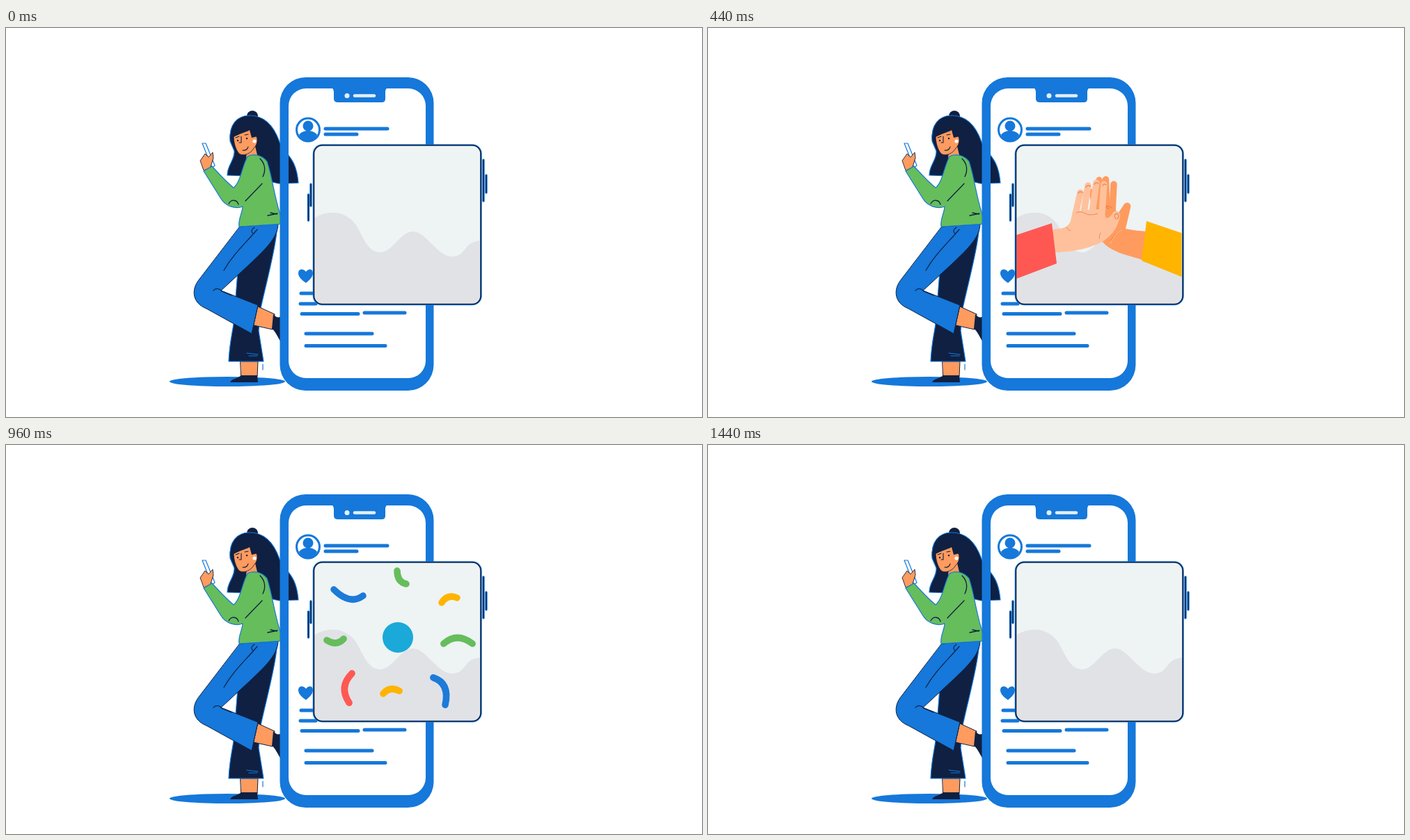
These frames come from a looping animation (1000 by 560 pixels, 1680 ms). An HTML page with a canvas:

```html
<!DOCTYPE html>
<html lang="en">
<head>
<meta charset="utf-8">
<title>High five</title>
<style>
html, body { margin: 0; width: 100%; height: 100%; overflow: hidden; background: #fff; }
canvas { display: block; width: 100%; height: 100%; }
</style>
</head>
<body>
<canvas id="stage" width="1000" height="560"></canvas>
<script>
const ctx = document.getElementById('stage').getContext('2d');
const LOOP = 1680, STEP = 40;
const BLUE = '#1578da', NAVY = '#0f2042', GREEN = '#66bd5c', SKIN = '#ff9b5e',
      PALE = '#ffc19c', RED = '#ff5853', YELLOW = '#ffb400';

const clamp = v => Math.max(0, Math.min(1, v));
const progress = (t, start, length) => clamp((t - start) / length);
const backOut = u => 1 + 2.7 * (u - 1) ** 3 + 1.7 * (u - 1) ** 2;

function fill(d, color, edge, width = 1.2) {
  ctx.fillStyle = color;
  ctx.fill(new Path2D(d));
  if (edge) stroke(d, edge, width);
}

function stroke(d, color, width) {
  ctx.strokeStyle = color;
  ctx.lineWidth = width;
  ctx.stroke(new Path2D(d));
}

function dot(x, y, r, color, ry = r) {
  ctx.fillStyle = color;
  ctx.beginPath();
  ctx.ellipse(x, y, r, ry, 0, 0, 7);
  ctx.fill();
}

function drawWoman() {
  dot(318, 509, 83, BLUE, 7);

  // hair
  dot(354, 127, 8, NAVY);
  fill('M322 163C320 139 332 126 350 126C373 126 386 144 393 164C401 183 417 185 420 223L392 224L345 213L318 212C318 197 329 190 328 177Z',
    NAVY, BLUE);

  // legs
  fill('M337 480H362L361 502H338Z', SKIN, NAVY, 1);
  fill('M338 500H361L362 510H322C325 504 333 505 338 500Z', NAVY);
  fill('M389 292C387 320 373 370 365 408L363 436L370 480H320C321 455 325 440 327 426L333 350Z', NAVY, BLUE);
  stroke('M346 468L362 470M349 472L361 472M369 484V492', BLUE, 1.2);
  fill('M362 401L386 412L383 434L356 428Z', SKIN, NAVY, 1);
  fill('M384 412C390 419 393 416 399 414L397 455C392 449 388 437 382 433Z', NAVY);
  fill('M336 286L391 282C391 302 370 321 350 340L309 378L362 399L353 440L288 404C268 396 266 378 276 364Z', BLUE, NAVY, 1);
  stroke('M361 290C344 310 326 326 313 349M298 378C302 373 308 376 310 379L324 385M357 287C352 290 352 294 355 296', NAVY, 1.2);

  // face
  fill('M346 176L345 188L361 183L358 170Z', SKIN);
  fill('M327 154C327 166 330 175 335 181C341 185 352 181 356 173C362 168 363 156 357 154L351 143Z', SKIN, NAVY, 0.8);
  fill('M322 160C325 141 338 135 352 137L361 156L353 158L350 147C343 151 334 152 322 160Z', NAVY);
  stroke('M338 156L338 165L335 165M340 176Q346 177 348 171M330 158L335 156M343 154L348 153', NAVY, 1.1);
  dot(333, 162, 1.2, NAVY);
  dot(346, 159, 1.2, NAVY);
  dot(357, 163, 2.6, '#fff');

  // hand with phone
  fill('M282 166L287 166L300 198L296 201Z', '#fff', BLUE, 1.2);
  fill('M284 205L279 191L286 181L291 186L297 179L298 187L294 200Z', SKIN, NAVY, 0.9);

  // sweater
  fill('M347 185C355 180 368 183 375 192C382 212 386 245 394 268L397 282L335 286C333 276 340 265 340 257C330 261 316 257 309 246L284 206L296 199C306 210 317 222 327 230C337 222 339 200 347 185Z',
    GREEN, BLUE, 1.2);
  stroke('M365 188C373 196 373 206 369 214M368 224L344 249M320 253C324 246 332 247 334 254M376 270L390 267M380 266L389 268', NAVY, 1.3);
}

function drawPhone() {
  ctx.fillStyle = BLUE;
  ctx.beginPath();
  ctx.roundRect(393.5, 71, 221, 451, 37);
  ctx.roundRect(406, 87, 197, 417, 25);
  ctx.fill('evenodd');
  fill('M466 85H550C546 87 545 89 545 93V102Q545 107 540 107H477Q471 107 471 102V93C471 89 470 87 466 85Z', BLUE);
  dot(490, 97.5, 3.5, '#e5effa');
  stroke('M501 97.5H529', '#e5effa', 4.5);

  // profile picture
  dot(434, 146.5, 18, BLUE);
  dot(434, 146.5, 15, '#fff');
  dot(434, 141, 7.5, BLUE);
  fill('M421 154C424 149 430 148 434 148S444 149 447 154C444 160 439 162 434 162S424 160 421 154Z', BLUE);

  stroke('M459 145H548M459 153H504M424 382H445M423 397H445M425 411.5H506M515 410H573M431 440H526M431 457.5H545', BLUE, 5);
  fill('M431 367C424 362 420 358 420 353C420 346 428 346 431 351C434 346 441 346 441 353C441 358 437 362 431 367Z', BLUE);
}

function outlineCard(color, width) {
  ctx.beginPath();
  ctx.roundRect(442.5, 169, 239.5, 228.5, 12);
  ctx.strokeStyle = color;
  ctx.lineWidth = width;
  ctx.stroke();
}

function drawCard() {
  const marks = 'M438 225V256M434.5 240V277M686 190V249M690 212V237';
  stroke(marks, BLUE, 3.4);
  stroke(marks, NAVY, 1.5);
  outlineCard(BLUE, 3.6);
  ctx.fillStyle = '#eef3f4';
  ctx.fill();
}

// centre x, centre y, colour, start time, arc
const ribbons = [
  [492, 217, '#1c7ad8', 680, 'M471 208Q494 231 513 217'],
  [567, 192, GREEN, 680, 'M562 181Q562 197 575 200'],
  [637, 222, YELLOW, 680, 'M626 227Q634 214 648 220'],
  [473, 282, GREEN, 720, 'M461 281Q475 290 485 279'],
  [649, 281, GREEN, 720, 'M629 286Q648 269 670 286'],
  [490, 350, RED, 720, 'M497 329Q478 348 493 371'],
  [553, 354, YELLOW, 720, 'M542 358Q551 347 565 354'],
  [627, 352, '#1c7ad8', 720, 'M614 335Q638 343 631 374']
];

function scaled(x, y, k, draw) {
  if (k <= 0) return;
  ctx.save();
  ctx.translate(x, y);
  ctx.scale(k, k);
  ctx.translate(-x, -y);
  draw();
  ctx.restore();
}

function drawBurst(t) {
  const leave = 1 - progress(t, 1280, 160) ** 2;
  scaled(563, 277, progress(t, 440, 120) * leave, () => dot(563, 277, 22, '#1aa9d8'));
  for (const [x, y, color, start, arc] of ribbons) {
    const u = progress(t, start, 260);
    if (u > 0) scaled(x, y, backOut(u) * leave, () => stroke(arc, color, 9.5));
  }
}

// 0 is the clap, 1.8 is out of sight
function handOffset(t) {
  if (t < 440) return 1.8 * (1 - progress(t, 160, 280)) ** 1.4;
  return 1.8 * progress(t, 520, 280) ** 1.74;
}

function drawRightHand(s) {
  ctx.save();
  ctx.translate(79 * s, 6 * s);
  stroke('M552 236L558 266M562 219L565 264M571.5 218L573 264M583 225L581 266', SKIN, 9.4);
  fill('M554 260L584 259L589 267L597 255C600 249 609 251 607 259L600 289C609 291 620 292 632 293L626 334C615 331 605 328 598 326C580 320 567 312 561 299C554 284 553 273 554 260Z', SKIN);
  stroke('M569 257Q575 255 581 259M596 289Q586 294 579 306M558 262Q567 255 576 260', '#e67b43', 1);
  stroke('M595 290C588 293 582 302 578 310', PALE, 1);
  fill('M630 278L680 295L770 325V394L680 358L623 335Z', YELLOW);
  ctx.restore();
}

// tilts back around the thumb as it leaves
function drawLeftHand(s) {
  ctx.save();
  ctx.translate(588 - 87 * s, 268 + 18 * s);
  ctx.rotate(-0.1 * s);
  ctx.translate(-588, -268);
  stroke('M535 237L528 268M546 227L540 266M558 223L552 265M569 225L566 266', PALE, 9.4);
  fill('M492 290C508 289 517 288 521 278L524 264L569 260L571 272C574 276 578 272 581 267C585 260 593 264 592 272C588 288 580 301 562 310C545 318 520 323 497 323Z', PALE);
  stroke('M529 266Q536 263 542 267T560 267M562 303Q562 298 564 295M515 287Q518 292 521 292', '#e98c5c', 1);
  stroke('M532 238Q534 234 538 237M543 229Q546 225 549 228M555 225Q558 221 561 224M567 227Q569 223 572 226M586 275Q582 268 588 267Q592 270 588 275', '#ef8a5a', 1.4);
  fill('M380 319L443 298L494 281L501 339L443 361L380 385Z', RED);
  ctx.restore();
}

function draw(t) {
  ctx.fillStyle = '#fff';
  ctx.fillRect(0, 0, 1000, 560);
  ctx.lineCap = ctx.lineJoin = 'round';
  drawWoman();
  drawPhone();
  drawCard();

  ctx.save();
  ctx.beginPath();
  ctx.roundRect(443.5, 170, 237, 226.5, 11);
  ctx.clip();
  fill('M443 274C462 261 489 263 503 284C513 300 519 322 537 323C556 323 566 293 585 293C603 293 620 329 641 329C662 329 656 308 682 306V397H443Z', '#e1e2e6');
  drawBurst(t);
  const s = handOffset(t);
  if (s < 1.8) {
    drawRightHand(s);
    drawLeftHand(s);
  }
  ctx.restore();
  outlineCard(NAVY, 1.6);
}

const begin = performance.now();
function tick() {
  const t = (performance.now() - begin) % LOOP;
  draw(Math.floor(t / STEP) * STEP);
  requestAnimationFrame(tick);
}
tick();
</script>
</body>
</html>
```
